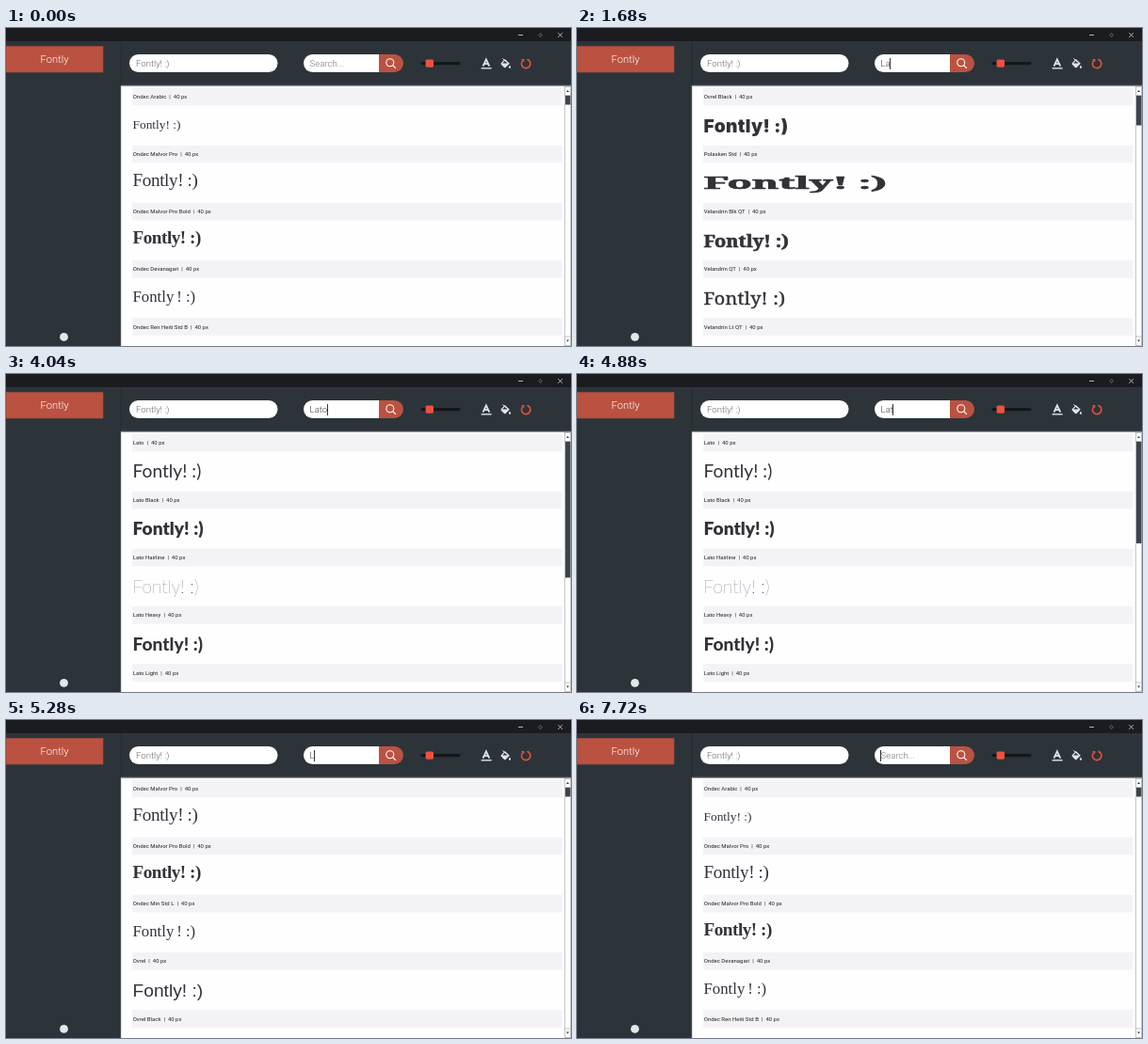
An HTML page for the animation above (7880 ms loop, 600 by 338 pixels).

```html
<!DOCTYPE html>
<html lang="en">
<head>
<meta charset="utf-8">
<title>Font browser</title>
<style>
  html, body { margin: 0; width: 100%; height: 100%; overflow: hidden; background: #2c343a; }
  svg { display: block; width: 600px; height: 338px; }
  text { font-family: Roboto, sans-serif; white-space: pre; }
  .label { font-size: 6px; fill: #222; }
  .field { font-size: 9.6px; font-weight: 300; fill: #444; }
  .sample { font-size: 19.2px; fill: #333337; }
  .times { font-family: "Liberation Serif", serif; }
  .slab { font-family: "Noto Serif", serif; font-size: 17.5px; stroke: #333337; }
  .lato { font-family: Lato, sans-serif; }
  .arial { font-family: "Liberation Sans", sans-serif; }
  .inter { font-family: Inter, sans-serif; font-weight: 900; }
</style>
</head>
<body>
<svg viewBox="0 0 600 338">
  <rect width="600" height="338" fill="#2c343a"/>
  <rect width="600" height="14" fill="#1a1c20"/>
  <path d="M122 14V338" stroke="#22292e"/>

  <!-- window buttons -->
  <g fill="none" stroke="#ddd" stroke-width=".8">
    <path d="M544 7.5h5M586.3 5.2l4.6 4.6m0-4.6l-4.6 4.6"/>
    <path d="M567.5 5.6l1.8 1.9-1.8 1.9-1.8-1.9z" stroke="#888" stroke-width=".7"/>
  </g>

  <!-- sidebar -->
  <rect x="0" y="19.5" width="103" height="27.5" fill="#bb5241" stroke="#a04a3e" stroke-width=".7"/>
  <text x="36.6" y="37.2" font-size="11.2" font-weight="300" fill="#fff">Fontly</text>
  <circle cx="61.5" cy="328.4" r="4.4" fill="#e4e6e7"/>

  <!-- fields -->
  <rect x="131" y="28" width="157.5" height="19" rx="9.5" fill="#fff"/>
  <text class="field" x="138" y="41" style="fill:#666">Fontly! :)</text>
  <path d="M396 28h-70.5a9.5 9.5 0 0 0 0 19H396z" fill="#fff"/>
  <path d="M396 28h16.5a9.5 9.5 0 0 1 0 19H396z" fill="#bb5241"/>
  <g fill="none" stroke="#fff" stroke-width="1.1">
    <circle cx="407.8" cy="36.7" r="4"/>
    <path d="M410.7 39.6l3.3 3.3"/>
  </g>
  <text class="field" id="query" x="322.6" y="41"></text>
  <rect id="caret" y="32" width="1" height="12" fill="#333"/>

  <!-- slider and tools -->
  <rect x="440.5" y="36" width="42" height="3.2" rx="1.6" fill="#14171a"/>
  <rect x="445.6" y="33.5" width="8.4" height="8.2" rx="1.6" fill="#ee5140"/>
  <g fill="none" stroke="#e2e4e5">
    <path d="M506.5 40.6l3.4-7.2 3.4 7.2M507.6 38.2h4.6" stroke-width="1.8"/>
    <path d="M504.6 42.8h11" stroke-width="1.4"/>
    <path d="M527.4 32.4l3.4 3.4" stroke-width="1"/>
  </g>
  <g fill="#e2e4e5">
    <path fill-rule="evenodd" d="M529.8 33l5 4.8-4.2 4.2q-.8.6-1.6 0l-3.2-3.2q-.6-.8 0-1.6zM529.8 34.8l-2.6 2.6h5.3z"/>
    <path d="M535 39.4q1.8 2.2.8 3.2-.8.6-1.6 0-1-1 .8-3.2z"/>
  </g>
  <path d="M553.4 33.4a4.7 4.7 0 1 1-4.8 1.4" fill="none" stroke="#e0503c" stroke-width="1.7"/>
  <path d="M547 33h3.4v3.4z" fill="#e0503c"/>

  <!-- results -->
  <rect x="122" y="61.5" width="478" height="276.5" fill="#fefdff"/>
  <path d="M122 61.2H600" stroke="#8d9297" stroke-width=".7"/>
  <path d="M122.2 61V338" stroke="#b8bbbe" stroke-width=".6"/>
  <g id="lists"></g>
  <rect x="593" y="62" width="7" height="276" fill="#fff"/>
  <g fill="#fff" stroke="#a4a7aa" stroke-width=".7">
    <rect x="593.4" y="62.4" width="6.2" height="9"/>
    <rect x="593.4" y="328" width="6.2" height="9.6"/>
    <path d="M593.4 71V328M599.6 71V328"/>
  </g>
  <path d="M595 68l1.5-2 1.5 2zM595 331.6l1.5 2 1.5-2z" fill="#333"/>
  <rect id="thumb" x="594" y="72" width="5.4" fill="#3c454c"/>
</svg>
<script>
const LOOP = 7880, ROW = 61.1, TEXT_X = 134.7, QUERY_X = 322.6;
const $ = id => document.getElementById(id);

// Sample faces: class, baseline below the label's centre, extra style, extension
const faces = {
  small: ["times", 33.7, "font-size:13.4px"],
  book: ["times", 33.5, "letter-spacing:-.4px"],
  bold: ["times", 33.4, "font-weight:700;letter-spacing:-.5px"],
  airy: ["times", 34.4, "font-size:16.8px"],
  sans: ["arial", 37.3, ""],
  heavySans: ["inter", 38, "letter-spacing:.3px"],
  wide: ["slab", 37, "font-weight:900;stroke-width:.6px", 2.45],
  slabBlack: ["slab", 37.5, "font-weight:800;stroke-width:.6px", 1.14],
  slab: ["slab", 37.5, "stroke-width:.4px;letter-spacing:.3px", 1.13],
  lato: ["lato", 37.3, ""],
  latoBlack: ["lato", 37.3, "font-weight:900"],
  latoThin: ["lato", 37.3, "font-weight:100"],
  latoHeavy: ["lato", 37.3, "font-weight:800"]
};

const lists = {
  all: [["Ondec Arabic", "small"], ["Ondec Malvor Pro", "book"], ["Ondec Malvor Pro Bold", "bold"],
        ["Ondec Devanagari", "airy"], ["Ondec Ren Heiti Std B"]],
  l: [["Ondec Malvor Pro", "book"], ["Ondec Malvor Pro Bold", "bold"], ["Ondec Min Std L", "airy"],
      ["Ovrel", "sans"], ["Ovrel Black"]],
  la: [["Ovrel Black", "heavySans"], ["Polasken Std", "wide"], ["Velandrin Blk QT", "slabBlack"],
       ["Velandrin QT", "slab"], ["Velandrin Lt QT"]],
  lato: [["Lato", "lato"], ["Lato Black", "latoBlack"], ["Lato Hairline", "latoThin"],
         ["Lato Heavy", "latoHeavy"], ["Lato Light"]]
};

// Query: shown list and lower end of the scroll thumb
const results = {
  "": ["all", 81.5], L: ["l", 81.5], La: ["la", 103.5], Lat: ["lato", 180], Lato: ["lato", 216.5]
};

// Time, query, caret visible
const steps = [
  [0, "", 0], [720, "", 1], [1200, "", 0], [1480, "L", 1], [1680, "La", 1], [2240, "Lat", 1],
  [2880, "Lato", 1], [3520, "Lato", 0], [4040, "Lato", 1], [4560, "Lato", 0], [4880, "Lat", 1],
  [5080, "La", 1], [5280, "L", 1], [5560, "", 1], [6160, "", 0], [6680, "", 1], [7200, "", 0], [7720, "", 1]
];

function row([name, face], i) {
  const y = 73 + i * ROW;
  let out = `<rect x="134" y="${y - 9.3}" width="456.5" height="18.6" fill="#f3f2f4"/>
    <text class="label" x="${TEXT_X}" y="${y + 2.1}">${name}\u00a0 |\u00a0 40 px</text>`;
  if (face) {
    const [cls, dy, style, stretch = 1] = faces[face];
    const sample = face === "airy" ? "Fontly\u200a\u200a! :)" : "Fontly! :)";
    out += `<text class="sample ${cls}" style="${style}"
      transform="translate(${TEXT_X - .2} ${y + dy}) scale(${stretch} 1)">${sample}</text>`;
  }
  return out;
}

$("lists").innerHTML = Object.entries(lists)
  .map(([id, rows]) => `<g id="list-${id}">${rows.map(row).join("")}</g>`).join("");

function draw(now) {
  const t = now % LOOP;
  const [, query, caret] = steps.findLast(s => s[0] <= t);
  const [shown, end] = results[query];
  for (const id in lists) $("list-" + id).style.display = id === shown ? "" : "none";
  $("thumb").setAttribute("height", end - 72);
  const field = $("query");
  field.textContent = query || "Search...";
  field.style.fill = query ? "#444" : "#777";
  $("caret").setAttribute("x", Math.floor(QUERY_X + (query ? field.getComputedTextLength() : 0)));
  $("caret").style.opacity = caret;
}

const start = performance.now();
(function tick() {
  draw(performance.now() - start);
  requestAnimationFrame(tick);
})();
</script>
</body>
</html>
```
